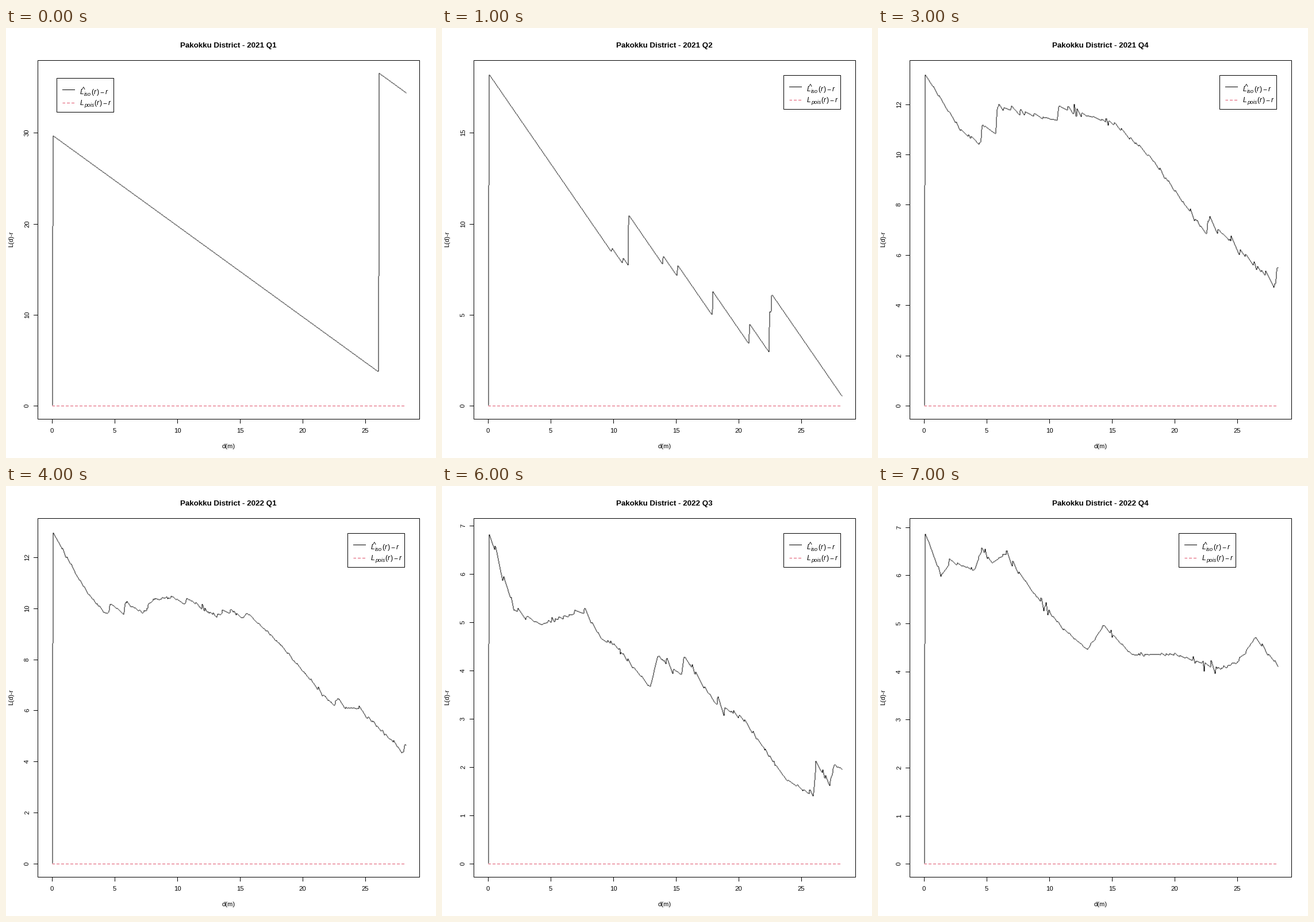
Recreate the animation shown at these times as a matplotlib script. Size 748x748 px, loop 8000 ms.

```python
import numpy as np
import matplotlib.pyplot as plt
from matplotlib.animation import FuncAnimation
from matplotlib.patches import Rectangle

SIZE = 748
PX = 0.72                                # points per pixel at 100 dpi
LEFT, RIGHT, TOP, BOTTOM = 55, 719, 55, 679
X0, X1, Y0, Y1 = 79.7, 695.2, 656.3, 78.2   # pixel range of the data
D = np.linspace(0, 28.2, 513)            # sampled distances in metres
XUNIT = (X1 - X0) / D[-1]
RED = "#DF536B"


def falling(start, *jumps):
    """Unit downward slope, lifted by a step at each (distance, rise)."""
    return start - D + sum(rise * (D >= d) for d, rise in jumps)


def bumpy(seed, *points):
    """Trend through key points with a random sawtooth on top."""
    rng = np.random.default_rng(seed)
    trend = np.interp(D, *zip(*points))
    edges = np.cumsum(rng.uniform(0.1, 0.75, 90))
    tooth = np.searchsorted(edges, D)
    start = np.r_[0, edges][tooth]
    phase = (D - start) / (edges[tooth] - start)
    height = rng.exponential(0.009, 91) * trend.max()
    height[0] = 0
    return trend + height[tooth] * (0.5 - phase)


def blend(a, b, peak):
    return peak * (a / a[0] + b / b[0]) / 2


q1_21 = falling(29.7, (26.05, 32.85))
q2_21 = falling(18.25, (9.85, 0.25), (10.7, 0.35), (11.15, 2.8), (13.9, 0.5),
                (15.05, 0.65), (17.85, 1.35), (20.8, 1.15), (22.4, 2.3),
                (22.55, 1.1))
q4_21 = bumpy(4, (0, 13.22), (2.9, 10.95), (4.5, 10.4), (4.6, 11.2),
              (5.7, 10.8), (5.8, 11.9), (10.6, 11.35), (10.7, 11.9),
              (15.2, 11.2), (18, 9.9), (22.5, 6.8), (22.6, 7.4), (28, 4.8),
              (28.1, 5.5))
q2_22 = bumpy(6, (0, 10.45), (2, 8.85), (4.1, 7.5), (4.8, 7.5), (7.2, 6.45),
              (8, 7.4), (9.6, 7.7), (13, 6.45), (14.2, 7), (15.2, 6.55),
              (15.5, 7.05), (21.7, 4.7), (23.5, 4.3), (24.5, 4.6),
              (28.2, 3.1))
q3_22 = bumpy(7, (0, 6.88), (2.1, 5.25), (4.2, 4.95), (7.7, 5.25), (9, 4.65),
              (10, 4.55), (12.9, 3.65), (13.5, 4.3), (15.4, 3.9),
              (15.6, 4.3), (18, 3.35), (20.3, 3), (23.7, 1.75), (25.9, 1.4),
              (26.1, 2.1), (27.2, 1.65), (27.6, 2.05), (28.2, 1.95))
q4_22 = bumpy(8, (0, 6.91), (1.4, 5.95), (2, 6.3), (4, 6.1), (4.6, 6.55),
              (5.4, 6.25), (6.5, 6.45), (8.5, 5.7), (11, 4.9), (13, 4.45),
              (14.3, 4.95), (16.5, 4.35), (20, 4.35), (23.6, 4.05),
              (25, 4.2), (26.4, 4.7), (28.2, 4.1))

CORNER = (594, 81)
# period, curve, tick step, legend corner
PANELS = [
    ("2021 Q1", q1_21, 10, (88, 86)),
    ("2021 Q2", q2_21, 5, CORNER),
    ("2021 Q3", blend(q2_21, q4_21, 15.6), 5, CORNER),
    ("2021 Q4", q4_21, 2, CORNER),
    ("2022 Q1", blend(q4_21, q2_22, 13.0), 2, CORNER),
    ("2022 Q2", q2_22, 2, CORNER),
    ("2022 Q3", q3_22, 1, CORNER),
    ("2022 Q4", q4_22, 1, (523, 81)),
]

plt.rcParams["font.family"] = "Liberation Sans"
fig = plt.figure(figsize=(SIZE / 100, SIZE / 100), dpi=100, facecolor="white")
ax = fig.add_axes([0, 0, 1, 1])


def line(x, y, color="black", **kw):
    ax.plot(x, y, color=color, lw=PX, **kw)


def dashed(x0, x1, y):
    line([x0, x1], [y, y], RED, ls=(0.5, (5, 3)), dash_capstyle="butt")


def box(x, y, w, h):
    ax.add_patch(Rectangle((x, y), w, h, fill=False, ec="black", lw=PX))


def crisp_curve(x, y):
    """Draw a one-pixel line without smoothing, column by column."""
    cols = np.arange(int(x[0] + 0.5), int(x[-1] + 0.5) + 2)
    ends = np.round(np.interp(np.r_[cols - 0.5, cols[-1] + 0.5], x, y))
    low = np.minimum(ends[:-1], ends[1:])
    high = np.maximum(np.maximum(ends[:-1], ends[1:]), low + 1)
    ax.fill_between(cols, low - 1, high - 1, step="post", color="black", lw=0)


def label(x, y, s, px=11.2, ha="center", **kw):
    ax.text(x, y, s, fontsize=px * PX, ha=ha, va="baseline",
            rotation_mode="anchor", **kw)


def formula(x, y, sub, shift):
    label(x, y, "L", 12, "left", style="italic")
    label(x + 7, y + 3, sub, 9.4, "left", style="italic")
    x += shift
    label(x, y, "(", 12, "left")
    label(x + 4.5, y, "r", 12, "left", style="italic")
    label(x + 9.5, y, ")", 12, "left")
    label(x + 15, y, "\u2212", 12, "left")
    label(x + 24, y, "r", 12, "left", style="italic")


def legend(x, y):
    box(x, y, 99, 59)
    line([x + 10, x + 31], [y + 20] * 2)
    dashed(x + 10, x + 31, y + 43)
    formula(x + 41, y + 28, "iso", 19.5)
    label(x + 46.5, y + 24, "^", 12)
    formula(x + 41, y + 47, "pois", 24.5)


def draw(i):
    period, curve, step, corner = PANELS[i]
    ax.clear()
    # whole numbers name pixels, counted from the top left
    ax.set_xlim(0, SIZE)
    ax.set_ylim(SIZE - 1, -1)
    ax.axis("off")

    box(LEFT, TOP, RIGHT - LEFT, BOTTOM - TOP)
    for d in range(0, 26, 5):
        x = round(X0 + d * XUNIT)
        line([x, x], [BOTTOM, BOTTOM + 7])
        label(x, 703.5, str(d))
    unit = (Y0 - Y1) / curve.max()
    for v in range(0, int((Y0 - TOP) / unit) + 1, step):
        y = round(Y0 - v * unit)
        line([LEFT - 7, LEFT], [y, y])
        label(40, y, str(v), rotation=90)

    label(386.5, 33, f"Pakokku District - {period}", 13.4, weight="bold")
    label(387.5, 730.5, "d(m)")
    label(12, 366, "L(d)-r", rotation=90)

    estimate = np.r_[0, curve[1:]]       # the estimate is zero at d = 0
    crisp_curve(X0 + D * XUNIT, Y0 - estimate * unit)
    dashed(round(X0), round(X1), round(Y0))
    legend(*corner)
    return []


anim = FuncAnimation(fig, draw, frames=len(PANELS), interval=1000,
                     init_func=lambda: draw(0), repeat=True, repeat_delay=0)
plt.show()
```
